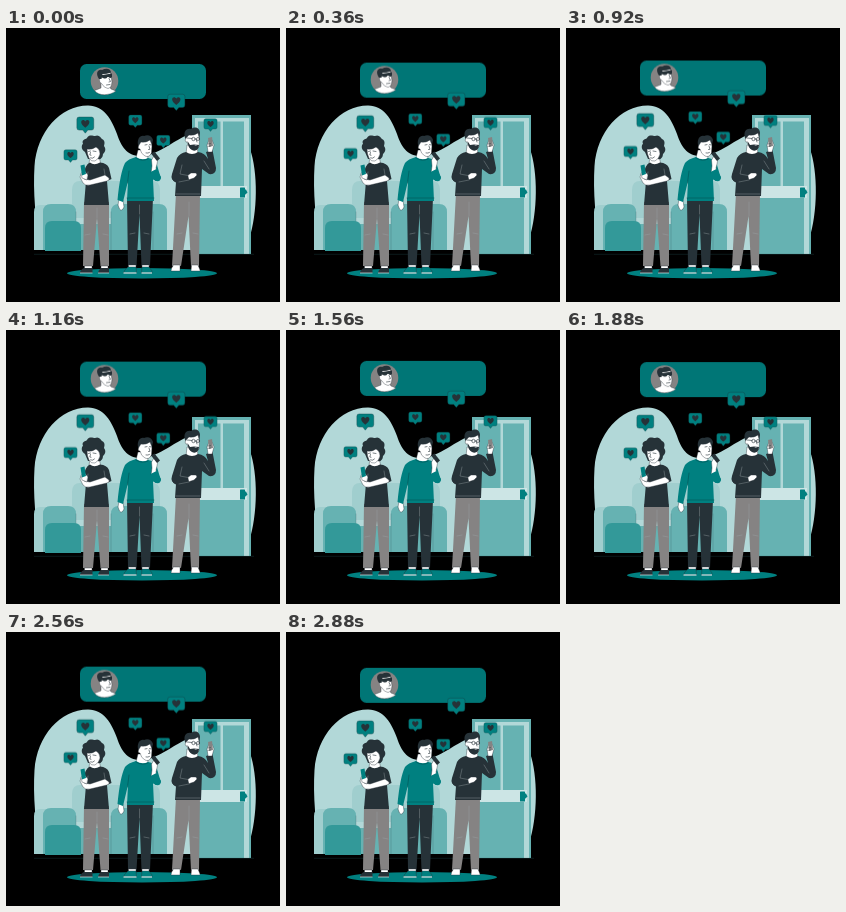
Recreate the animation shown at these times as an HTML page. Size 274 px wide and 274 px high, loop 2920 ms.

```html
<!DOCTYPE html>
<html lang="en">
<head>
<meta charset="utf-8">
<title>Friends and likes</title>
<style>
  html, body { margin: 0; width: 100%; height: 100%; overflow: hidden; background: #000; }
  svg { display: block; width: 100vw; height: 100vh; }
  .float { animation: float 2920ms linear infinite; }
  @keyframes float {
    50% { transform: translateY(-5.48px); }
  }
  .teal { fill: #008080; }
  .panel { fill: #007676; }
  .pale { fill: #b2d8d8; }
  .light { fill: #a0cece; }
  .mid { fill: #66b2b2; }
  .deep { fill: #339999; }
  .dark { fill: #263238; }
  .gray { fill: #858383; }
  .skin { fill: #fff; stroke: #263238; stroke-width: .4; stroke-linejoin: round; }
  .ink { fill: none; stroke: #263238; stroke-width: .6; stroke-linecap: round; stroke-linejoin: round; }
  .seam { fill: none; stroke: #9ba5a8; stroke-width: .4; stroke-linecap: round; }
  .shade { fill: none; stroke: #00494b; stroke-width: .5; stroke-linecap: round; }
</style>
</head>
<body>
<svg viewBox="0 0 274 274">
  <defs>
    <!-- like bubble centred on its box -->
    <g id="like">
      <path class="teal" stroke="#173e42" stroke-width=".3" d="M-4.8-5.2H4.8Q6.6-5.2 6.6-3.4V3.2Q6.6 5 4.8 5H2L0 7.4-2 5H-4.8Q-6.6 5-6.6 3.2V-3.4Q-6.6-5.2-4.8-5.2Z"/>
      <path class="dark" d="M0 3.1C-1.4 1.9-3.2.6-3.2-1.1-3.2-3.2-.8-3.5 0-1.7.8-3.5 3.2-3.2 3.2-1.1 3.2.6 1.4 1.9 0 3.1Z"/>
    </g>
  </defs>

  <!-- backdrop -->
  <path class="pale" d="M36 222C29 195 27 162 28.500 138C31 104 54 77.500 82 77.500C98 77.500 106 92 111 106C115 118 121 128 134 128C151 128 163 115 189 103C211 95 236 103 244 121C252 144 252 184 243 212L240 222Z"/>

  <!-- sofa -->
  <path class="light" d="M66 190V162Q66 153 74 153H146Q154 153 154 162V190Z"/>
  <path class="light" d="M28 222V184Q28 177 34 177H45V222Z"/>
  <path class="mid" d="M37 222V184Q37 176 45 176H62Q70 176 70 184V196H105V184Q105 176 113 176H153Q161 176 161 184V222Z"/>
  <path class="deep" d="M39 223V200Q39 193 46 193H68Q75 193 75 200V223Z"/>
  <path class="ink" stroke-opacity=".3" d="M70 184V193M105 184V222M147 184V222"/>

  <!-- door -->
  <path class="mid" d="M186 87H245V226H186Z"/>
  <path class="pale" d="M189 90H243V226H189Z"/>
  <path class="mid" d="M192 93.500H214.500V158H192ZM217 93.500H238V158H217ZM192 170H238V226H192Z"/>
  <path fill="#cce5e5" d="M189 158H241V170H189Z"/>
  <rect class="teal" x="234" y="159.500" width="5" height="10" rx=".6"/>
  <path class="teal" d="M237 161.500H240L241.500 164.500L239.500 166.500H237Z"/>
  <path stroke="#1b4245" stroke-width=".4" d="M28 226.300H248"/>

  <ellipse class="teal" cx="136" cy="245.200" rx="75" ry="5.200"/>

  <!-- left friend -->
  <g>
    <path class="gray" d="M78 174H103L103 238H94.500L91 190L87 238H77Z"/>
    <path class="seam" d="M91 180V190M79 207L84 206M97 206L102 207"/>
    <path class="skin" d="M78.500 238H86V241H78.500ZM95 238H102V241H95Z"/>
    <path class="dark" d="M78 240H86.500V245H74Q74 242 78 240ZM95 240H103V245H92Q92 242 95 240Z"/>
    <path stroke="#fff" stroke-width=".6" d="M74 245H86.500M92 245H103"/>
    <path class="skin" d="M84 128H93L95 137L88 140L83 136Z"/>
    <path class="dark" d="M84 134.500Q88 138 94 134.500Q101 135 103 140L105.500 151L101 153L103 177H78L80 153L77 149Q79 136 84 134.500Z"/>
    <path class="dark" d="M79 124C74 121 76 116 77 116C75 111 81 111 81 110C83 106 87 108 89 108C93 106 95 110 96 111C100 113 98 117 98 118C101 122 98 125 97 126C97 130 94 132 92 131H82Z"/>
    <path class="skin" d="M81 121Q86 122 90 119Q94 121 94 126Q93 131 89 133Q85 134 83 130Q81 126 81 121Z"/>
    <path class="ink" d="M82.500 123.500L84.500 123M87 123L90 123.500M84.500 124.500L83.800 127L85 127.300M84.500 130Q87 131 88.500 129"/>
    <path class="skin" d="M78 151L84 152L99 147L103 150Q104 152 101 153L84 157Q79 158 77 155L74 149L75 146L78 147Z"/>
    <path class="skin" d="M75 145L79 143.500L82 147L81 152L76 150Z"/>
    <path class="teal" d="M74.500 137.500L78.500 136.500L80 146L76 147.500Z"/>
    <path class="seam" d="M98 141L99 147M82 144L81 150"/>
  </g>

  <!-- middle friend -->
  <g>
    <path class="skin" d="M113 171L117 172L118 179Q116 184 113.500 181L112 177Z"/>
    <path class="dark" d="M121 170H147L144 238H135.500L133.500 186L130.500 238H122Z"/>
    <path class="seam" d="M133.500 177V186M124 206L129 205M138 205L143 206"/>
    <path class="skin" d="M122.500 237H130V241H122.500ZM136 237H143V241H136Z"/>
    <path class="teal" stroke="#263238" stroke-width=".4" d="M122 239H130L130.500 245H117.500Q118 242 122 239ZM136 239H143L146 243V245H135.500Z"/>
    <path stroke="#fff" stroke-width="1" d="M117.500 245H130.500M135.500 245H146"/>
    <path class="skin" d="M132 122H141L142 131L136 134L130 130Z"/>
    <path class="teal" d="M130 129Q136 133 142 130Q149 131 151 137L154.500 149Q155 153 150 153L147 151L148 173H121L122 153L117 174L111.500 172Q114 145 119 135Q122 131 130 129Z"/>
    <path class="shade" d="M123 143L121.500 155M146 141L147 150L150 152M121 170H148M130 130Q136 134 142 131"/>
    <path class="dark" d="M132 117C131 111 134 107 138 108C142 106 146 108 147 112L145 121H134Z"/>
    <path class="skin" d="M133 117L135 114Q140 115 144 112L146 117L145.500 125Q143 130 139 128Q135 126 134 121Q131 121 133 117Z"/>
    <path class="ink" d="M139 117L141 116.600M143.500 116.600L145.500 117M143 118L144 121.300L142.500 121.500M140 125Q142 125.500 143.500 124.500"/>
    <path class="skin" d="M146 138L145.500 132L148 128L152 130L151 136L150 140L152 148L149 150L145 145Z"/>
    <path class="teal" d="M144.500 144L150.500 141L155 149Q155 154 150 153L145 150Z"/>
    <path class="dark" d="M145 125.500L148.500 123.500L154 130.500L151 133Z"/>
  </g>

  <!-- right friend -->
  <g>
    <path class="gray" d="M170 165H194L193 238H185L182.500 188L175 238H166Z"/>
    <path class="seam" d="M183 174V188M171 206L176 205M187 205L192 206"/>
    <path class="skin" d="M167 237H174V243H165Q165 240 167 238ZM185.500 237H192L194 242V243H185Z"/>
    <path class="skin" d="M181 117H191L192 127L186 129L180 126Z"/>
    <path class="dark" d="M180 124Q186 128 192 124Q199 125 202 131L200 124L206.500 122L210 140Q210 147 203 146L196 141L195 168H169L170 154Q164 152 166 146L171 130Q174 125 180 124Z"/>
    <path class="dark" d="M179 110C177 103 181 100 185 101C189 98 194 100 194 105L193 113H181Z"/>
    <path class="skin" d="M180 110L183 107Q188 108 192 105L193.500 111L193 119Q190 123 186 121Q182 119 181 114Q178 114 180 110Z"/>
    <path class="dark" d="M181.500 113L184 117L188 116.500L193 117L192.500 120Q190 124 186 122Q182 120 181.500 113Z"/>
    <path class="skin" d="M188 117.500Q190 118.500 191.500 117.300"/>
    <path class="ink" d="M181 110L186 110.500M190 111L191 114"/>
    <circle class="ink" cx="187.500" cy="111" r="1.700"/>
    <circle class="ink" cx="192" cy="111" r="1.500"/>
    <path class="skin" d="M202 124L201 117L203 112L206 112L208 117L206 124Z"/>
    <path class="gray" d="M202 110L206 109L207 118L203 119Z"/>
    <path class="skin" d="M201.500 116L205 115.500M201.500 118.500L205 118"/>
    <path class="skin" d="M181 148L185 145H190L191 147L188 150L182 152Z"/>
    <path class="dark" d="M167 145L182 147L183 152L172 155Q166 154 166 149Z"/>
    <path class="seam" d="M176 137L174 146L182 147.500M183 152L173 154M198 133L203 141M170 166H194"/>
  </g>

  <!-- floating likes and message -->
  <g class="float">
    <rect class="panel" x="74" y="36" width="126" height="35" rx="6.500"/>
    <circle class="gray" cx="98.500" cy="53" r="13.800"/>
    <path class="skin" d="M95 54L103 58L105 61L110 63Q105 66.800 98.500 66.800Q92 66.800 88.500 62.500L95 60Z"/>
    <path class="skin" d="M94 46L104.500 44.500L106 54Q105.500 60 102 60.500Q98 60 96 56Q92.500 54 93.500 50Z"/>
    <path class="dark" d="M93 51C89 45 92 41 96 42C100 39.500 105 40.500 105 44.500Q100 46 96.500 46L95.500 51Z"/>
    <path class="dark" d="M93 47.500L106 45.500V49Q104.500 51 102.500 49H101.500Q100 51.500 97 50L93 48.500Z"/>
    <path class="ink" d="M103 50.500L104.500 53.500L103 54M100.500 57L104 56.500"/>
    <use href="#like" transform="translate(170.300 73) scale(1.300)"/>
    <use href="#like" transform="translate(79.300 95.700) scale(1.280)"/>
    <use href="#like" x="64.500" y="127"/>
    <use href="#like" x="129.300" y="92.200"/>
    <use href="#like" x="157.300" y="112.500"/>
    <use href="#like" x="204.500" y="96"/>
  </g>
</svg>
</body>
</html>
```
